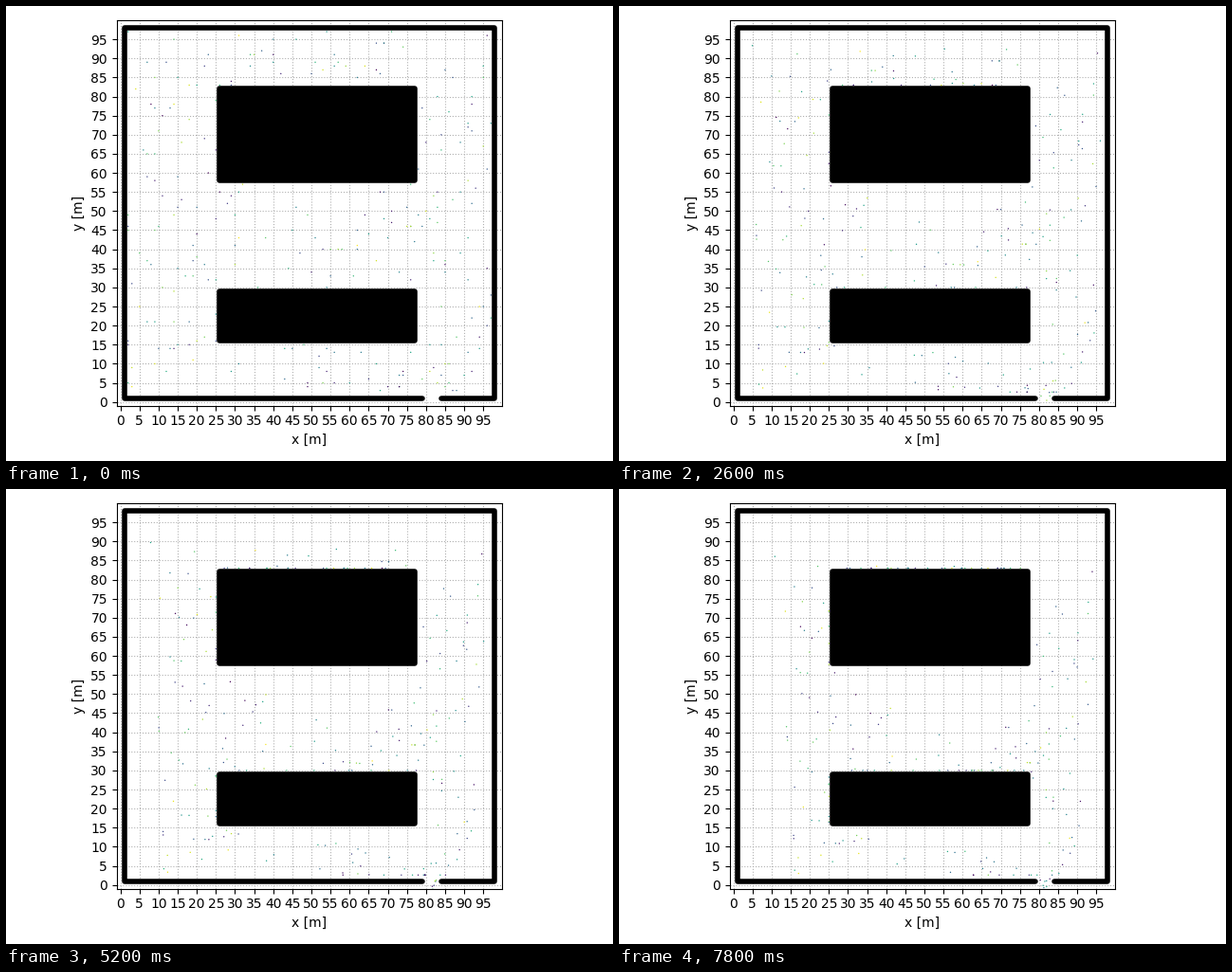
A matplotlib script for the animation above (8 s loop, 640x480 px).

```python
import numpy as np
import matplotlib.pyplot as plt
from matplotlib.animation import FuncAnimation
from matplotlib.patches import Rectangle

W, H, DPI = 640, 480, 100
FRAMES, INTERVAL = 40, 200
PEOPLE = 250
SPEED = 0.361                      # metres per frame
GOAL = np.array([81.6, -1.5])
DOOR = (79.9, 83.1)
WALL_Y = 2.6                       # closest approach to the lower wall
BLOCKS = [(26, 77, 58, 82), (26, 77, 16, 29)]
THICK = 4                          # wall width in points

rng = np.random.default_rng(11)


def inside(p, block):
    x0, x1, y0, y1 = block
    x, y = p.T
    return (x > x0 - 1) & (x < x1 + 1) & (y > y0 - 1) & (y < y1 + 1)


def spawn(count):
    p = rng.integers(2, 98, (count * 3, 2)).astype(float)
    blocked = np.any([inside(p, b) for b in BLOCKS], axis=0)
    return p[~blocked][:count]


def step(p):
    """Walk straight to the door, sliding along anything in the way."""
    to_goal = GOAL - p
    dist = np.maximum(np.hypot(*to_goal.T), 1e-9)
    q = p + to_goal * (np.minimum(SPEED, dist) / dist)[:, None]
    for b in BLOCKS:
        hit = inside(q, b)
        above = p[:, 1] >= b[3] + 1
        q[hit & above, 1] = b[3] + 1
        q[hit & ~above, 0] = b[0] - 1
    in_door = (q[:, 0] > DOOR[0]) & (q[:, 0] < DOOR[1])
    low = q[:, 1] < WALL_Y
    passed = p[:, 1] < WALL_Y - 0.7
    q[low & ~in_door & ~passed, 1] = WALL_Y
    return q


track = [spawn(PEOPLE)]
for _ in range(FRAMES - 1):
    track.append(step(track[-1]))
shades = rng.random(PEOPLE)

fig, ax = plt.subplots(figsize=(W / DPI, H / DPI), dpi=DPI)
ax.set_xlim(-1, 100)
ax.set_ylim(-1, 100)
ax.set_aspect("equal")
ax.set_xticks(range(0, 100, 5))
ax.set_yticks(range(0, 100, 5))
ax.set_xlabel("x [m]")
ax.set_ylabel("y [m]")
ax.set_axisbelow(True)
ax.grid(linestyle=":")

# One open outline whose gap is the door.
ax.plot([79, 1, 1, 98, 98, 84], [1, 1, 98, 98, 1, 1], color="k", lw=THICK,
        solid_capstyle="round", solid_joinstyle="round", zorder=3)
for x0, x1, y0, y1 in BLOCKS:
    ax.add_patch(Rectangle((x0, y0), x1 - x0, y1 - y0, fc="k", ec="k",
                           lw=THICK, joinstyle="round", zorder=3))

crowd = ax.scatter(*track[0].T, c=shades, cmap="viridis", vmin=0, vmax=1,
                   s=1, marker="o", linewidths=0, zorder=4)
crowd.set_snap(False)
fig.tight_layout()


def draw(i):
    crowd.set_offsets(track[i])
    return (crowd,)


anim = FuncAnimation(fig, draw, frames=FRAMES, interval=INTERVAL,
                     repeat=True, repeat_delay=0)
plt.show()
```
